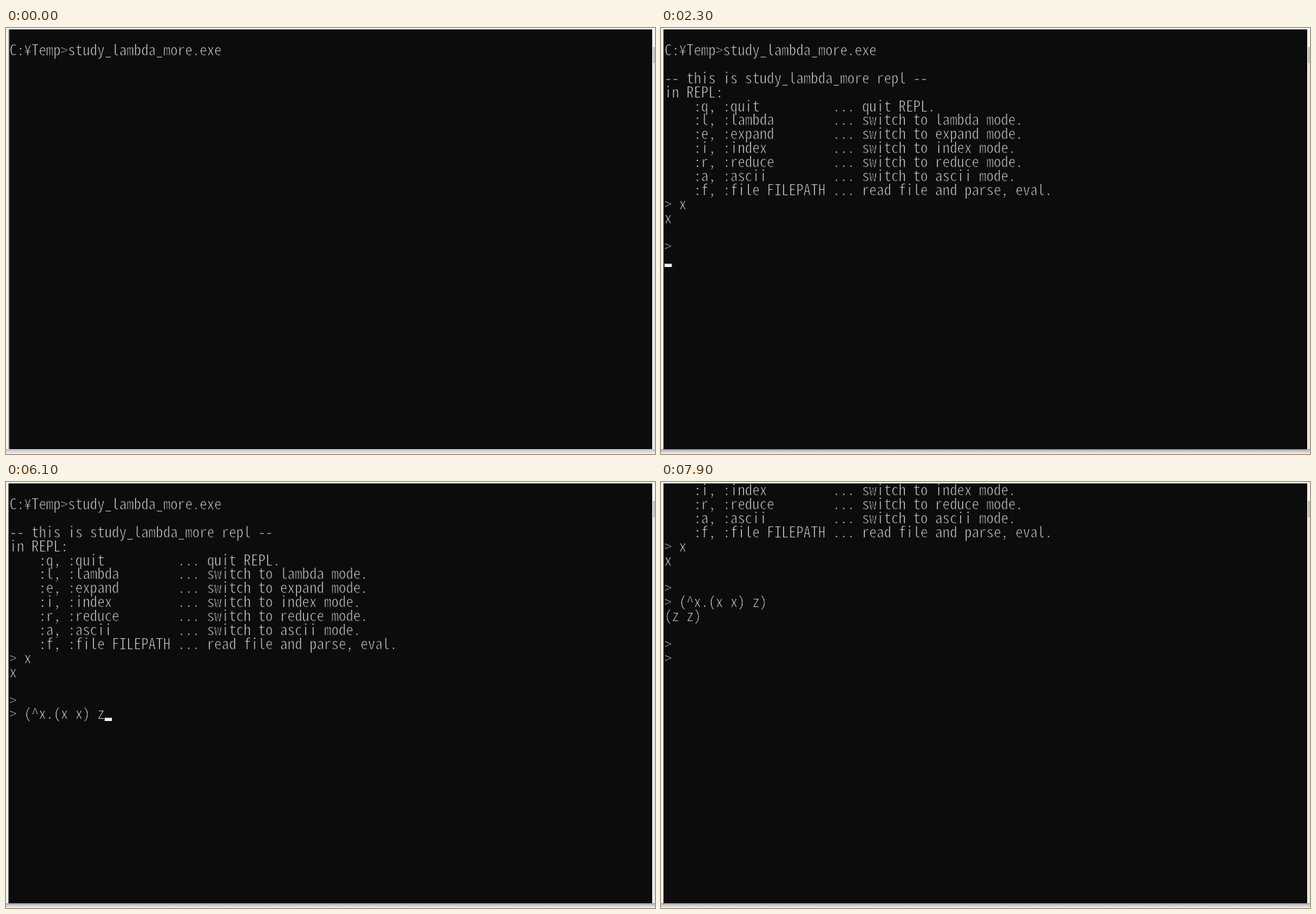
An HTML page with a canvas for the animation above (8000 ms loop, 924 by 606 pixels).

```html
<!DOCTYPE html>
<html lang="en">
<head>
<meta charset="utf-8">
<title>Lambda REPL</title>
<style>
  html, body { margin: 0; width: 100%; height: 100%; overflow: hidden; background: #f4f4f4; }
  canvas { display: block; }
</style>
</head>
<body>
<canvas id="stage" width="924" height="606"></canvas>
<script>
const ctx = document.getElementById('stage').getContext('2d');
const LOOP = 8000;
const CELL = 10.42, ROW = 19.9, LEFT = 5, TOP = 2;
const FAMILY = '"Noto Sans Mono CJK JP", "Noto Sans Mono", "Liberation Mono", monospace';
const INK = '#d0d0d0', SCREEN = '#0c0c0c';

const help = (keys, text) => '    ' + keys.padEnd(19) + '... ' + text + '\n';
const mode = name => help(`:${name[0]}, :${name}`, `switch to ${name} mode.`);
const banner = '\n-- this is study_lambda_more repl --\nin REPL:\n' +
  help(':q, :quit', 'quit REPL.') +
  ['lambda', 'expand', 'index', 'reduce', 'ascii'].map(mode).join('') +
  help(':f, :file FILEPATH', 'read file and parse, eval.') + '> ';

// Each step: time in ms, text appended to the console, cursor shown.
const steps = [
  [0, '\nC:¥Temp>study_lambda_more.exe', false],
  [400, '\n', true],
  [800, '', false],
  [900, banner, true],
  [1400, '', false],
  [1500, 'x', true],
  [1700, '\nx\n\n> ', true],
  [2300, '\n', true],
  [2400, '> ', true],
  [2900, '(', true],
  [3300, '^', true],
  [3600, 'x', true],
  [3700, '', false],
  [3900, '.', true],
  [4200, '', false],
  [4500, '(', true],
  [4700, 'x', false],
  [5000, ' ', true],
  [5200, 'x', true],
  [5600, ')', false],
  [5900, ' ', true],
  [6100, 'z', true],
  [6500, '', false],
  [6600, ')', true],
  [7000, '', false],
  [7100, '\n(z z)\n\n> ', true],
  [7300, '\n> ', true],
  [7800, '', false]
];
const SCROLL_TIME = 7900, SCROLL_ROWS = 8;

// Choose the font size whose advance fills one console cell.
ctx.font = `100px ${FAMILY}`;
const fontSize = 100 * CELL / ctx.measureText('0').width;

function box(color, x, y, w, h) {
  ctx.fillStyle = color;
  ctx.fillRect(x, y, w, h);
}

function drawWindow(active) {
  box('#f4f4f4', 0, 0, 924, 606);
  const shadow = ctx.createLinearGradient(0, 599, 0, 606);
  shadow.addColorStop(0, active ? '#a8a8a8' : '#bcbcbc');
  shadow.addColorStop(1, '#f4f4f4');
  box(shadow, 0, 599, 924, 7);
  box('#e6e6e6', 921, 27, 3, 572);
  box('#c4c4c4', 921, 27, 3, 23);
  box(active ? '#808080' : '#c8c8c8', 3, 2, 917, 598);
  box(SCREEN, active ? 4 : 4.5, 2, active ? 916 : 915.5, 597);
}

function drawLine(text, row) {
  const y = TOP + row * ROW + 17;
  ctx.fillStyle = INK;
  ctx.fillText(text, LEFT, y);
  // A fine outline in the screen colour makes the strokes thinner.
  ctx.strokeText(text, LEFT, y);
}

function draw(time) {
  const past = steps.filter(([start]) => start <= time);
  const lines = past.map(step => step[1]).join('').split('\n');
  const cursorOn = past[past.length - 1][2];
  const firstRow = time >= SCROLL_TIME ? SCROLL_ROWS : 0;

  drawWindow(time >= 400);
  ctx.font = `${fontSize}px ${FAMILY}`;
  ctx.strokeStyle = SCREEN;
  ctx.lineWidth = 0.7;
  ctx.lineJoin = 'round';
  lines.slice(firstRow).forEach(drawLine);

  if (cursorOn) {
    const row = lines.length - 1, column = lines[row].length;
    const bottom = Math.round(TOP + (row + 1) * ROW);
    box('#f2f2f2', LEFT + column * CELL, bottom - 4.6, CELL, 4.6);
  }
}

function tick(now) {
  draw(now % LOOP);
  requestAnimationFrame(tick);
}
draw(0);
requestAnimationFrame(tick);
</script>
</body>
</html>
```
